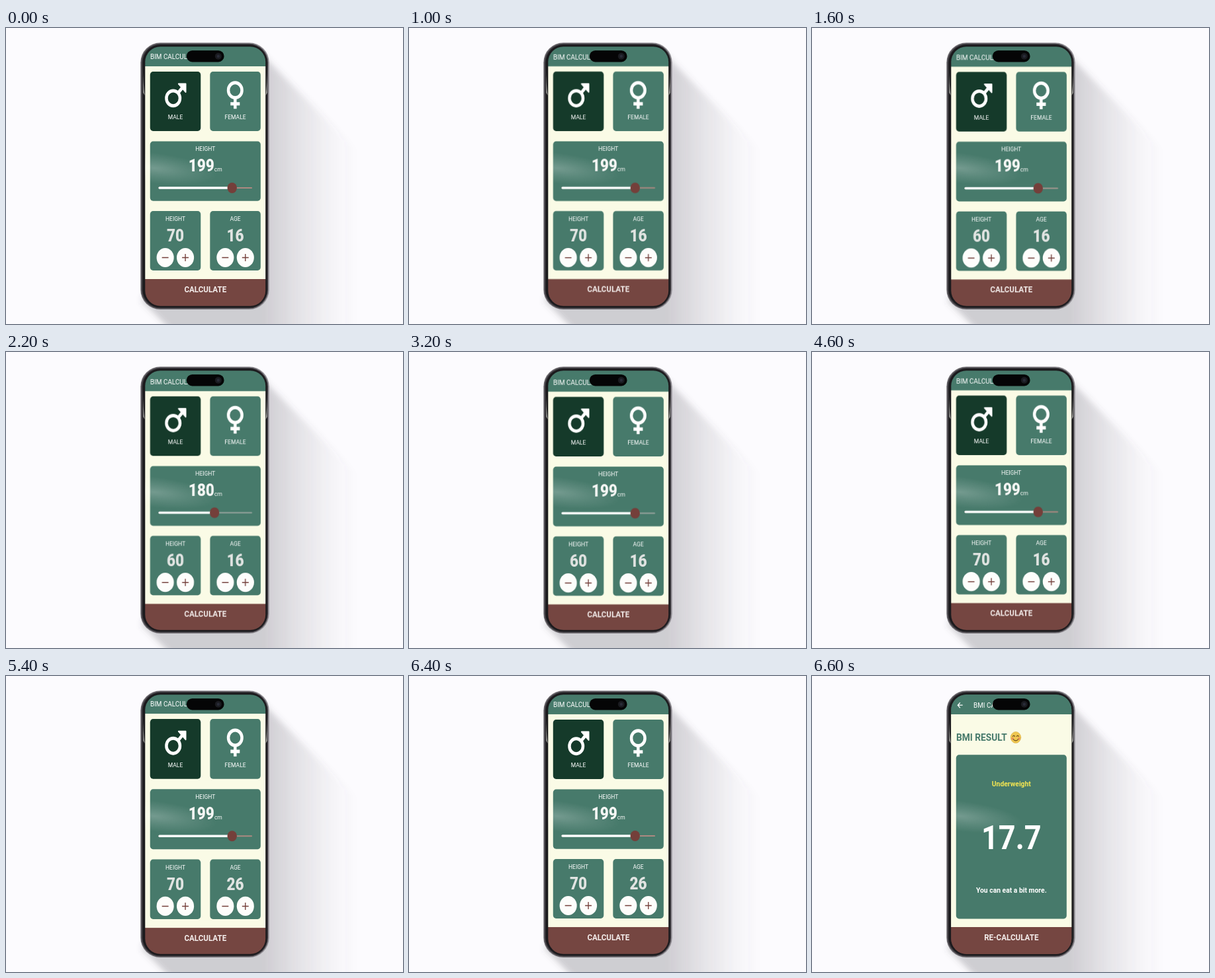
An HTML page for the animation above (7.6 s loop, 600 px wide and 448 px high).

```html
<!DOCTYPE html>
<html lang="en">
<head>
<meta charset="utf-8">
<title>BMI calculator</title>
<style>
  html, body { margin: 0; width: 100%; height: 100%; overflow: hidden; background: #fcfbfe; }
  svg { display: block; width: 100vw; height: 100vh; }
  text { font-family: Roboto, Arial, sans-serif; fill: #fff; }
  .mid { text-anchor: middle; }
  .bar { font-size: 11px; }
  .label { font-size: 9.5px; text-anchor: middle; }
  .num { font-size: 25px; font-weight: 900; text-anchor: middle; fill: #e1e4e2; }
  .unit { font-size: 9.5px; font-weight: 400; }
  .cta { font-size: 12.9px; font-weight: 700; text-anchor: middle; fill: #f3ecea; }
  .note { font-size: 11.5px; font-weight: 700; text-anchor: middle; }
  .green { fill: #477a6b; }
  .dark { fill: #153a2a; }
  .cream { fill: #fafbe6; }
  .maroon { fill: #754641; }
  .icon { fill: none; stroke: #fff; stroke-width: 5; }
  .sign { stroke: #743f3a; stroke-width: 1.5; }

  #drift { transform-origin: 0 219px; animation: drift 7600ms linear infinite; }
  #rest { animation: tint 7600ms linear infinite; }
  #result { animation: show 7600ms linear infinite; }

  @keyframes drift {
    0%, 13.16% { transform: translateY(0) scaleY(1); }
    28.95% { transform: translateY(1.2px) scaleY(1); }
    42.11% { transform: translateY(2px) scaleY(1); }
    60.53% { transform: translateY(0) scaleY(1); }
    71.05% { transform: translateY(.1px) scaleY(1.0065); }
    84.87%, 100% { transform: translateY(0) scaleY(1); }
  }
  @keyframes tint {
    0%, 14% { stroke: #ad8981; }
    28%, 43% { stroke: #96a29d; }
    60%, 100% { stroke: #ad8981; }
  }
  @keyframes show {
    0%, 84.87% { opacity: 0; }
    86.84%, 99.99% { opacity: 1; }
    100% { opacity: 0; }
  }
</style>
</head>
<body>
<svg viewBox="0 0 600 448" preserveAspectRatio="none">
  <defs>
    <linearGradient id="shade" gradientUnits="userSpaceOnUse" x1="390" y1="0" x2="530" y2="0">
      <stop offset="0" stop-color="#55525c" stop-opacity=".27"/>
      <stop offset=".35" stop-color="#55525c" stop-opacity=".15"/>
      <stop offset=".75" stop-color="#55525c" stop-opacity=".04"/>
      <stop offset="1" stop-color="#55525c" stop-opacity="0"/>
    </linearGradient>
    <linearGradient id="rim" x1="0" y1="0" x2="1" y2="0">
      <stop offset="0" stop-color="#6b686d"/>
      <stop offset=".5" stop-color="#77747a"/>
      <stop offset="1" stop-color="#918e94"/>
    </linearGradient>
    <radialGradient id="glow">
      <stop offset="0" stop-color="#fff" stop-opacity=".24"/>
      <stop offset=".5" stop-color="#fff" stop-opacity=".11"/>
      <stop offset="1" stop-color="#fff" stop-opacity="0"/>
    </radialGradient>
    <filter id="soft" x="-20%" y="-20%" width="140%" height="140%"><feGaussianBlur stdDeviation="5"/></filter>
    <clipPath id="glass"><rect x="210.3" y="28.3" width="181.9" height="392.4" rx="23"/></clipPath>
    <g id="stepper">
      <circle cx="-16.9" r="14.5" fill="#fdfdfb"/>
      <circle cx="16.9" r="14.5" fill="#fdfdfb"/>
      <path class="sign" d="M-22.4 0h11M11.4 0h11M16.9 -5.5v11"/>
    </g>
  </defs>

  <rect width="600" height="448" fill="#fcfbfe"/>
  <path d="M385 38L535 190V470H262L205 413Z" fill="url(#shade)" filter="url(#soft)"/>

  <!-- phone body -->
  <rect x="203.3" y="22.3" width="194.4" height="403.8" rx="30" fill="url(#rim)"/>
  <rect x="204.8" y="23.8" width="191.2" height="400.8" rx="28.5" fill="#3d3a3f"/>
  <rect x="206.6" y="25.2" width="188" height="398" rx="27" fill="#1b1a1d"/>
  <path d="M206.8 60Q207.2 84 209.6 102L207.4 98Z M395.2 60Q394.8 84 392.6 102L394.8 98Z" fill="#dcdcd4" opacity=".7"/>

  <g clip-path="url(#glass)">
    <g id="drift">
      <!-- the app is shown slightly narrowed -->
      <g transform="translate(301.3 0) scale(.9 1)">
        <rect class="cream" x="-105" y="10" width="210" height="430"/>
        <rect class="green" x="-105" y="10" width="210" height="48"/>
        <rect class="maroon" x="-105" y="380" width="210" height="60"/>

        <g id="form">
          <text class="bar" x="-92.6" y="47.3">BIM CALCULATOR</text>
          <rect class="dark" x="-92.8" y="66" width="85" height="90" rx="5"/>
          <rect class="green" x="7.8" y="66" width="85" height="90" rx="5"/>
          <rect class="green" x="-92.8" y="171.5" width="185.6" height="90.3" rx="5"/>
          <rect class="green" x="-92.8" y="277" width="85" height="90" rx="5"/>
          <rect class="green" x="7.8" y="277" width="85" height="90" rx="5"/>

          <circle class="icon" cx="-54" cy="106.3" r="11.4"/>
          <path class="icon" d="M-46 98.5L-37 88.5"/>
          <path d="M-45 84.5H-33V97Z" fill="#fff" stroke="#fff" stroke-width="2" stroke-linejoin="round"/>
          <circle class="icon" cx="50" cy="94.2" r="11.4"/>
          <path class="icon" d="M50 106V122.3M42.2 114.7H57.8"/>
          <text class="label" x="-50.3" y="138.5">MALE</text>
          <text class="label" x="50.3" y="138.5">FEMALE</text>

          <text class="label" x="0" y="185.7">HEIGHT</text>
          <text class="num" x="0" y="216.8" style="fill:#f6f7f5"><tspan id="height">199</tspan><tspan class="unit">cm</tspan></text>
          <path id="rest" d="M-78 242H77.6" stroke-width="2" stroke-linecap="round"/>
          <path id="done" stroke="#fff" stroke-width="3.4" stroke-linecap="round"/>
          <circle id="thumb" cy="242" r="8" fill="#743f3a"/>

          <text class="label" x="-50.3" y="292.3">HEIGHT</text>
          <text class="num" id="weight" x="-50.3" y="323.2">70</text>
          <use href="#stepper" x="-50.5" y="347.5"/>
          <text class="label" x="50.3" y="292.3">AGE</text>
          <text class="num" id="age" x="50.3" y="323.2">16</text>
          <use href="#stepper" x="50.3" y="347.5"/>
          <text class="cta" x="0" y="399.7">CALCULATE</text>
        </g>

        <g id="result">
          <rect class="cream" x="-105" y="10" width="210" height="430"/>
          <rect class="green" x="-105" y="10" width="210" height="48"/>
          <rect class="maroon" x="-105" y="380" width="210" height="60"/>
          <path d="M-81.8 44.2H-90M-86 40.2L-90 44.2L-86 48.2" fill="none" stroke="#fff" stroke-width="1.3"/>
          <text class="bar" x="-63.6" y="47.8">BMI CALCULATOR</text>
          <text x="-92.6" y="98.3" style="font-size:15.3px;font-weight:700;fill:#477a6b">BMI RESULT</text>
          <g transform="translate(7.4 93)" fill="none" stroke="#6b4a1c" stroke-linecap="round">
            <circle r="8.6" fill="#efc750" stroke="#d9a93c" stroke-width=".6"/>
            <g fill="#e8935a" stroke="none"><circle cx="-5.4" cy="1.8" r="2"/><circle cx="5.4" cy="1.8" r="2"/></g>
            <path d="M-5 -1.6Q-3.3 -4.2 -1.6 -1.6M1.6 -1.6Q3.3 -4.2 5 -1.6M-4 2.8Q0 7 4 2.8" stroke-width="1.2"/>
          </g>
          <rect class="green" x="-92.8" y="119.3" width="185.6" height="248.2" rx="5"/>
          <text class="note" x="0" y="166.7" style="fill:#f3e552">Underweight</text>
          <text class="mid" x="0" y="262" style="font-size:50px;font-weight:700">17.7</text>
          <text class="note" x="0" y="328">You can eat a bit more.</text>
          <text class="cta" x="0" y="400.3">RE-CALCULATE</text>
        </g>
      </g>
    </g>
    <ellipse cx="224" cy="212" rx="95" ry="23" fill="url(#glow)" transform="rotate(7 224 212)"/>
  </g>

  <!-- camera island -->
  <rect x="272.8" y="34" width="56.8" height="17.4" rx="8.7" fill="#050506"/>
  <circle cx="320.8" cy="42.8" r="5" fill="#1a1b20"/>
  <circle cx="320.8" cy="42.8" r="2.2" fill="#292c38"/>
</svg>
<script>
  const LOOP = 7600;
  const el = id => document.getElementById(id);

  // keys: [time, value] pairs
  const tracks = {
    height: [[0, 199], [1650, 199], [2150, 180], [2300, 180], [3100, 199]],
    weight: [[0, 70], [1050, 70], [1600, 60], [3350, 60], [4450, 70]],
    age: [[0, 16], [4650, 16], [5350, 26]]
  };

  function valueAt(keys, t) {
    for (let i = 1; i < keys.length; i++) {
      const [t0, a] = keys[i - 1], [t1, b] = keys[i];
      if (t < t1) return a + (b - a) * (t - t0) / (t1 - t0);
    }
    return keys[keys.length - 1][1];
  }

  function draw(t) {
    for (const id in tracks) el(id).textContent = Math.round(valueAt(tracks[id], t));
    const x = -78 + 155.6 * (valueAt(tracks.height, t) - 120) / 100;
    el('thumb').setAttribute('cx', x);
    el('done').setAttribute('d', `M-77 242H${x}`);
  }

  let start;
  function tick(now) {
    start ??= now;
    draw((now - start) % LOOP);
    requestAnimationFrame(tick);
  }
  draw(0);
  requestAnimationFrame(tick);
</script>
</body>
</html>
```
